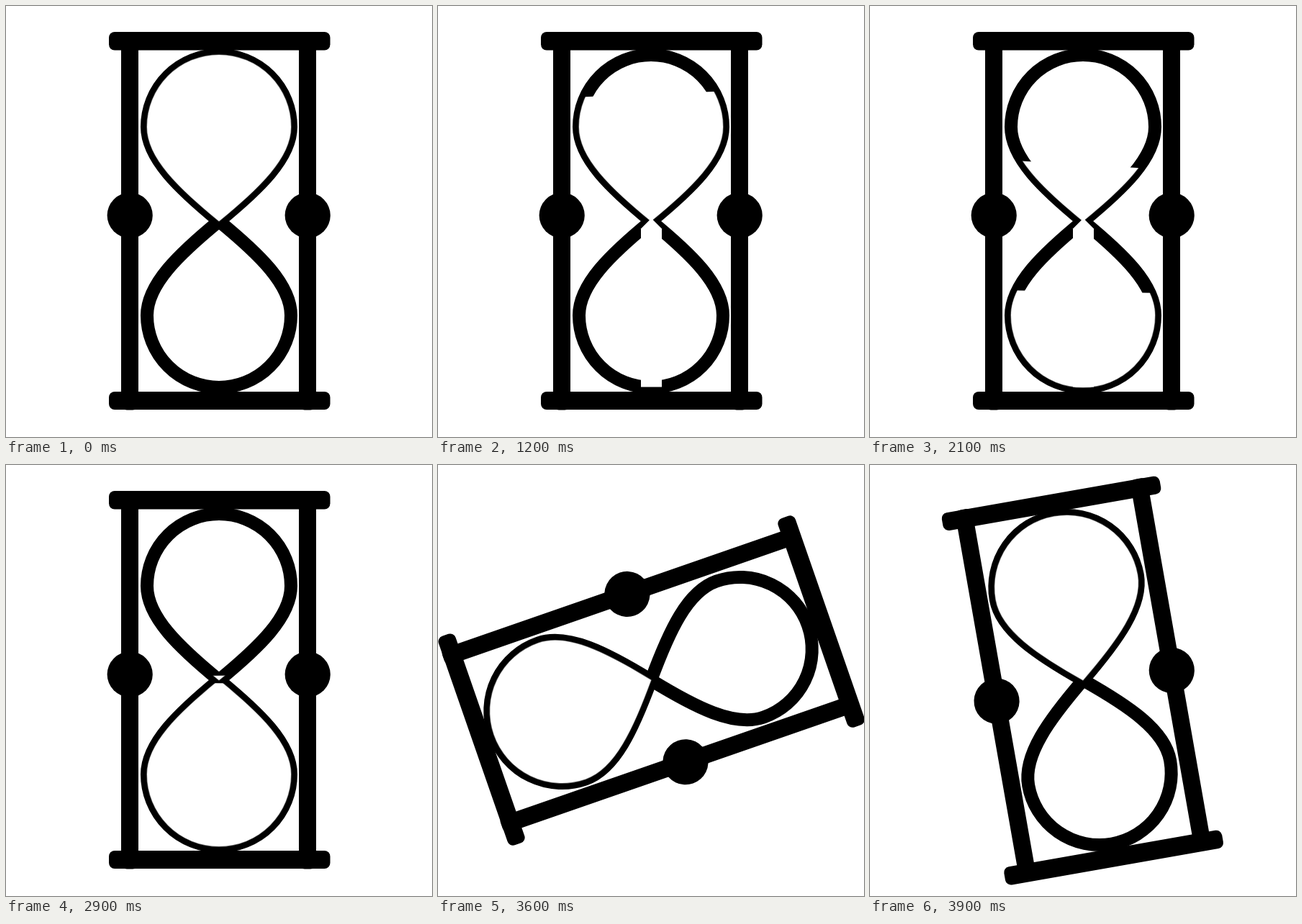
An HTML page with a canvas for the animation above (4 s loop, 592 by 599 pixels).

```html
<!DOCTYPE html>
<html>
<head>
<meta charset="utf-8">
<title>Hourglass</title>
<style>
html, body { margin: 0; width: 100%; height: 100%; overflow: hidden; background: #fff; }
canvas { display: block; }
</style>
</head>
<body>
<canvas id="stage" width="592" height="599"></canvas>
<script>
const ctx = document.getElementById('stage').getContext('2d');
const LOOP = 4000, STEP = 100;
const CX = 296, CY = 299;

// Piecewise linear value from [time, value] pairs, held at both ends.
function track(t, keys) {
  if (t <= keys[0][0]) return keys[0][1];
  for (let i = 1; i < keys.length; i++) {
    const [t0, a] = keys[i - 1], [t1, b] = keys[i];
    if (t <= t1) return a + (b - a) * (t - t0) / (t1 - t0);
  }
  return keys[keys.length - 1][1];
}

// One bulb of the glass; dir is -1 for the upper, 1 for the lower.
function bulb(dir) {
  const y = d => CY + dir * d;
  const p = new Path2D();
  p.moveTo(CX, CY);
  p.bezierCurveTo(CX - 56, y(46), CX - 100, y(88), CX - 100, y(131));
  p.arc(CX, y(131), 100, Math.PI, 0, dir > 0);
  p.bezierCurveTo(CX + 100, y(88), CX + 56, y(46), CX, CY);
  p.closePath();
  return p;
}
const upper = bulb(-1), lower = bulb(1);

function polygon(points) {
  ctx.beginPath();
  points.forEach(([x, y]) => ctx.lineTo(x, y));
  ctx.closePath();
}

function roundBar(x, y, w, h, r) {
  ctx.beginPath();
  ctx.roundRect(x, y, w, h, r);
  ctx.fill();
}

function drawFrame() {
  ctx.fillStyle = '#000';
  roundBar(143, 36, 307.5, 25.5, 8);
  roundBar(143, 536, 307.5, 25, 8);
  for (const x of [172, 419]) {
    roundBar(x - 12, 40, 24, 521.5, 8);
    ctx.beginPath();
    ctx.arc(x + 0.2, 291, 31.6, 0, 2 * Math.PI);
    ctx.fill();
  }
  ctx.strokeStyle = '#000';
  ctx.lineWidth = 18;
  ctx.lineJoin = 'bevel';
  ctx.stroke(upper);
  ctx.stroke(lower);
}

// White sand with a soft rim: the bulb's inside, limited to a polygon.
function drawSand(path, limits) {
  ctx.save();
  polygon(limits);
  ctx.clip();
  ctx.fillStyle = '#fff';
  ctx.fill(path);
  ctx.lineJoin = 'bevel';
  ctx.strokeStyle = 'rgba(255,255,255,0.4)';
  ctx.lineWidth = 1.5;
  ctx.stroke(path);
  ctx.restore();
}

function drawUpperSand(t) {
  if (t >= 3000) return;
  const left = track(t, [[600, 66], [1200, 127], [1800, 181], [2400, 247], [3000, 303]]);
  const right = track(t, [[600, 66], [1200, 118], [1800, 204], [2400, 250], [3000, 300]]);
  drawSand(upper, [[CX - 110, left], [CX + 110, right], [CX + 110, 305], [CX - 110, 305]]);
}

function drawLowerSand(t) {
  if (t <= 1200) return;
  const half = track(t, [[1200, 14.5], [1800, 110]]);
  const left = track(t, [[1200, 520], [1800, 452], [2400, 338], [3000, 295]]);
  const right = track(t, [[1200, 520], [1800, 448], [2400, 350], [3000, 295]]);
  drawSand(lower, [[CX - half, left], [CX + half, right], [CX + half, 540], [CX - half, 540]]);
}

function drawStream(t) {
  if (t <= 0 || t >= 2900) return;
  const top = 295;
  const half = track(t, [[2400, 14.5], [2900, 0]]);
  const tip = track(t, [[0, top], [600, 340], [1200, 529.5]]);
  const x = CX + 0.5;
  ctx.save();
  ctx.beginPath();
  ctx.rect(0, 0, 592, tip);
  ctx.clip();
  polygon([[x, top], [x + half, top + half], [x + half, 530], [x - half, 530], [x - half, top + half]]);
  ctx.fillStyle = '#fff';
  ctx.fill();
  ctx.restore();
}

function draw(t) {
  const u = track(t, [[3300, 0], [LOOP, 1]]);
  ctx.setTransform(1, 0, 0, 1, 0, 0);
  ctx.fillStyle = '#fff';
  ctx.fillRect(0, 0, 592, 599);
  ctx.translate(CX, CY);
  ctx.rotate(Math.PI * u * u * (3 - 2 * u));
  ctx.translate(-CX, -CY);
  drawFrame();
  drawUpperSand(t);
  drawLowerSand(t);
  drawStream(t);
}

const start = performance.now();
function tick() {
  const t = (performance.now() - start) % LOOP;
  draw(Math.floor(t / STEP) * STEP);
  requestAnimationFrame(tick);
}
tick();
</script>
</body>
</html>
```
